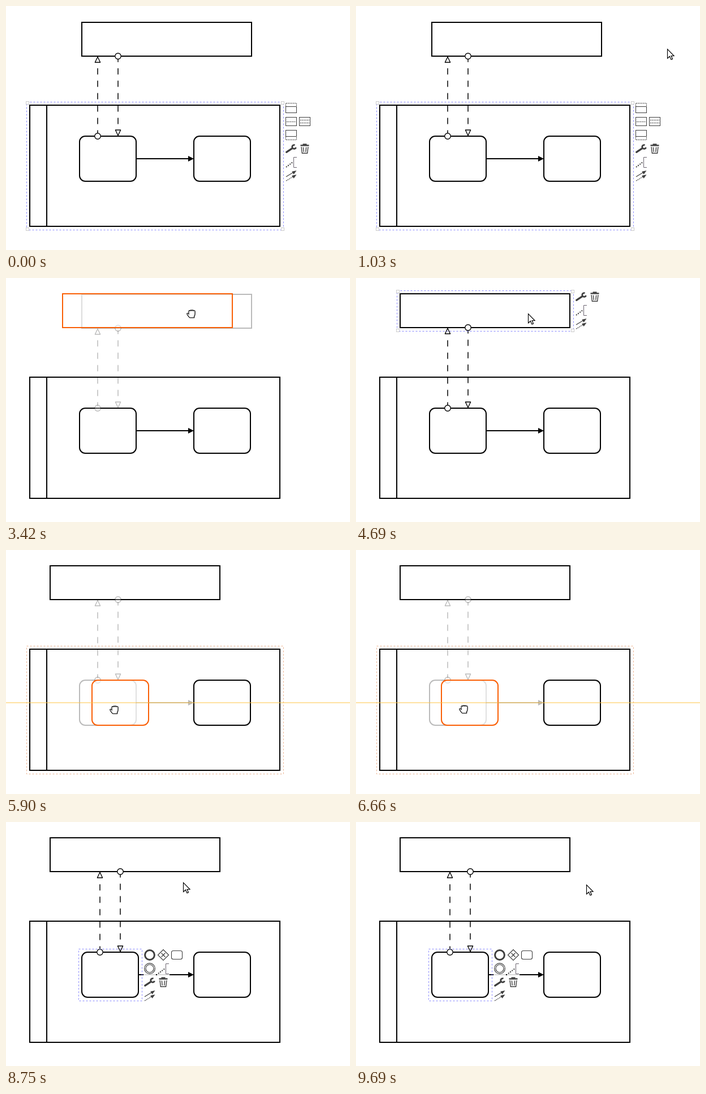
An HTML page with a canvas for the animation above (9.79 s loop, 608 by 433 pixels).

```html
<!DOCTYPE html>
<html lang="en">
<head>
<meta charset="utf-8">
<title>Diagram editor</title>
<style>
html, body { margin: 0; width: 100%; height: 100%; overflow: hidden; background: #fff; }
canvas { display: block; }
</style>
</head>
<body>
<canvas id="stage" width="608" height="433"></canvas>
<script>
const ctx = document.getElementById('stage').getContext('2d');
const LOOP = 9790, TICK = 40;
const BLUE = '#8888ff', HOVER = '#ebb28e', ORANGE = '#fa5f05', ICON = '#3e3e3e';
const POOL = { x: 42, y: 176, w: 442, h: 215 };
const NEXT = { x: 332, y: 231, w: 100, h: 80 };

// Phases of the story, as [start, end) in ms
const PARTNER_DRAG = [2900, 4650];
const TASK_DRAG = [5740, 6820];
const TASK_DRAG_2 = [7500, 7830];
const GRAB = { partner: { x: 360, y: 64 }, task: { x: 168, y: 282 } };

// Pointer moves; each begins where the last one ended and may bend through a control point
const moves = [];
function move(start, end, to, bend) {
  const from = moves.length ? moves[moves.length - 1].to : to;
  const mid = bend || { x: (from.x + to.x) / 2, y: (from.y + to.y) / 2 };
  moves.push({ start, from, mid, to, steps: Math.round((end - start) / TICK) + 1 });
}
const at = (x, y) => ({ x, y });
move(510, 510, at(544, 42));
move(870, 1270, at(475, 100), at(585, 86));
move(1940, 2460, GRAB.partner);
move(2860, 3790, at(305, 63));
move(4090, 4090, at(304, 63));
move(5250, 5490, GRAB.task);
move(5700, 6660, at(189, 282), at(225, 286));
move(7500, 7660, at(172, 276));
move(8100, 8750, at(313, 107), at(131, 272));
move(9050, 9690, at(407, 111));

function pointer(t) {
  const m = moves.filter(m => m.start <= t).pop();
  if (!m) return null;
  const u = Math.min(1, (Math.floor((t - m.start) / TICK) + 1) / m.steps);
  const curve = k => Math.round((1 - u) ** 2 * m.from[k] + 2 * u * (1 - u) * m.mid[k] + u * u * m.to[k]);
  return at(curve('x'), curve('y'));
}

const during = (t, [start, end], tail = 0) => t >= start && t < end + tail;
const inside = (p, r) => p.x >= r.x && p.x <= r.x + r.w && p.y >= r.y && p.y <= r.y + r.h;

function pen(color, width, dash = []) {
  ctx.strokeStyle = color;
  ctx.lineWidth = width;
  ctx.setLineDash(dash);
}

function trace(p) {
  ctx.beginPath();
  for (let i = 0; i < p.length; i += 2) ctx.lineTo(p[i], p[i + 1]);
}

function line(...p) {
  trace(p);
  ctx.stroke();
}

function poly(fill, ...p) {
  trace(p);
  ctx.closePath();
  ctx.fillStyle = fill;
  ctx.fill();
}

function circle(x, y, r, fill = 'transparent') {
  ctx.beginPath();
  ctx.arc(x, y, r, 0, Math.PI * 2);
  ctx.fillStyle = fill;
  ctx.fill();
  ctx.stroke();
}

function box(r, color = '#000', radius = 0, fill = '#fff') {
  pen(color, 2);
  ctx.beginPath();
  ctx.roundRect(r.x, r.y, r.w, r.h, radius);
  ctx.fillStyle = fill;
  ctx.fill();
  ctx.stroke();
}

function faded(on, paint) {
  ctx.globalAlpha = on ? .27 : 1;
  paint();
  ctx.globalAlpha = 1;
}

function outline(r, color) {
  pen(color, 1, [3, 3]);
  ctx.strokeRect(r.x - 5.5, r.y - 5.5, r.w + 12, r.h + 12);
}

function handles(r) {
  pen('#ccc', 1);
  ctx.fillStyle = '#fff';
  for (const x of [r.x - 6.5, r.x + r.w + 2.5])
    for (const y of [r.y - 6.5, r.y + r.h + 2.5]) {
      ctx.fillRect(x, y, 5, 5);
      ctx.strokeRect(x, y, 5, 5);
    }
}

function messageFlow(x, from, to) {
  const d = Math.sign(to - from), base = to - d * 11;
  ctx.save();
  ctx.lineCap = ctx.lineJoin = 'round';
  pen('#000', 1.5, [10, 12]);
  ctx.lineDashOffset = 5;
  line(x, from + d * 5, x, base);
  pen('#000', 1.4);
  circle(x, from, 5.25, '#fff');
  poly('#fff', x, to - d * 1.2, x - 4.6, base, x + 4.6, base);
  ctx.stroke();
  ctx.restore();
}

function sequenceFlow(x) {
  pen('#000', 2);
  line(x, 271, 323, 271);
  poly('#000', 322, 266, 332, 271, 322, 276);
}

// Icons are drawn around their own centre
function split(...rows) {
  pen(ICON, 1);
  ctx.strokeRect(-9.5, -7.5, 19, 15);
  pen(ICON, 1, [2, 1]);
  rows.forEach(y => line(-8, y, 8, y));
}

function lane(side) {
  pen(ICON, 1);
  ctx.strokeRect(-9.5, -2.5 * side, 19, 11 * side);
  pen(ICON, 1, [2, 1]);
  line(-9.5, -3 * side, -9.5, -8.5 * side, 9.5, -8.5 * side, 9.5, -3 * side);
}

const icons = {
  laneAbove: () => lane(1),
  laneBelow: () => lane(-1),
  split: () => split(.5),
  splitThree: () => split(-2.5, 2.5),
  wrench() {
    ctx.lineCap = 'round';
    pen(ICON, 3.2);
    line(-8.3, 6.3, 1.5, -.2);
    ctx.lineCap = 'butt';
    pen(ICON, 2.8);
    ctx.beginPath();
    ctx.arc(5.2, -3, 3.4, .3, 5.1);
    ctx.stroke();
  },
  trash() {
    pen(ICON, 2.4);
    line(-7.5, -5.6, 7.5, -5.6);
    line(-3.5, -7.4, 3.5, -7.4);
    pen(ICON, 1.4);
    line(-6, -3, -4.6, 8.3, 4.6, 8.3, 6, -3);
    for (const s of [-1, 1]) line(2.7 * s, -2.5, 1.7 * s, 6);
  },
  note() {
    pen(ICON, 2, [2, 2]);
    line(-9, 9, 3, 0);
    pen('#6b6470', 1);
    line(10, -8.5, 4.5, -8.5, 4.5, 9.5, 10, 9.5);
  },
  connect() {
    for (const [y, dash] of [[-9, []], [-1.7, [2, 1]]]) {
      pen(ICON, 1.1, dash);
      line(-9, y + 11, 5, y + 2.5);
      poly(ICON, 9.5, y, 1.2, y + 1.8, 4.6, y + 6.8);
    }
  },
  end() { pen(ICON, 3); circle(0, 0, 8.4); },
  ring() { pen(ICON, 1.2); circle(0, 0, 9.4); circle(0, 0, 7); },
  gate() {
    pen(ICON, 1.2);
    line(0, -9.5, 9.5, 0, 0, 9.5, -9.5, 0, 0, -9.5);
    for (const s of [-3.5, 3.5]) line(-3.5, -s, 3.5, s);
  },
  task() {
    pen(ICON, 1.1);
    ctx.beginPath();
    ctx.roundRect(-9.5, -7.5, 19, 15, 3);
    ctx.stroke();
  }
};

const PARTNER_PAD = ['wrench trash', 'note', 'connect'];
const POOL_PAD = ['laneAbove', 'split splitThree', 'laneBelow', ...PARTNER_PAD];
const TASK_PAD = ['end gate task', 'ring note', 'wrench trash', 'connect'];

function pad(r, rows) {
  rows.forEach((row, j) => row.split(' ').forEach((name, i) => {
    ctx.save();
    ctx.translate(r.x + r.w + 20 + i * 24, r.y + 5 + j * 24);
    ctx.fillStyle = 'rgba(255,255,255,.85)';
    ctx.fillRect(-11, -11, 22, 23);
    icons[name]();
    ctx.restore();
  }));
}

function guide(...p) {
  pen('rgba(255,195,66,.5)', 2);
  line(...p);
}

function arrowPath() {
  trace([.5, .6, .5, 17, 4.3, 13.3, 6.9, 19, 9.4, 17.9, 7, 12.5, 12, 12.5]);
  ctx.closePath();
}

function handPath() {
  ctx.beginPath();
  ctx.moveTo(4, 9);
  for (let i = 0; i < 4; i++) ctx.arc(5.4 + i * 2.7, 3 - Math.sin(i) * .8, 1.4, Math.PI, 0);
  ctx.quadraticCurveTo(15.5, 10, 13.5, 12);
  ctx.lineTo(13.5, 14.5);
  ctx.lineTo(5.5, 14.5);
  ctx.quadraticCurveTo(-3, 4.5, 4, 7);
  ctx.closePath();
}

function cursor(p, hand) {
  ctx.save();
  ctx.translate(p.x - (hand ? 7 : 0), p.y - (hand ? 7 : 0));
  pen('#000', 1.15);
  ctx.fillStyle = '#fff';
  ctx.shadowColor = 'rgba(0,0,0,.3)';
  ctx.shadowBlur = 1.5;
  ctx.shadowOffsetX = ctx.shadowOffsetY = .8;
  (hand ? handPath : arrowPath)();
  ctx.fill();
  ctx.shadowColor = 'transparent';
  ctx.stroke();
  ctx.restore();
}

function hovered(t, p, partner, task) {
  if (!p || during(t, [PARTNER_DRAG[0], 5250])) return null;
  // After a drop the old hover stays until the pointer moves again
  if (during(t, [TASK_DRAG[0], 7350]) || during(t, [TASK_DRAG_2[0], 8140])) return POOL;
  return [partner, task, NEXT, POOL].find(r => inside(p, r)) || null;
}

function draw(t) {
  const p = pointer(t);
  const dragPartner = during(t, PARTNER_DRAG);
  const dragTask = during(t, TASK_DRAG) || during(t, TASK_DRAG_2);
  const moved = t >= PARTNER_DRAG[1];
  const partner = { x: moved ? 78 : 134, y: moved ? 28 : 29, w: 300, h: 60 };
  const task = { ...NEXT, x: t < TASK_DRAG[1] ? 130 : t < TASK_DRAG_2[1] ? 151 : 134 };

  let selected = task, tools = TASK_PAD;
  if (t < PARTNER_DRAG[0]) [selected, tools] = [POOL, POOL_PAD];
  else if (t < TASK_DRAG[0]) [selected, tools] = [partner, PARTNER_PAD];
  if (dragPartner || dragTask) selected = null;
  const hover = hovered(t, p, partner, task);

  ctx.fillStyle = '#fff';
  ctx.fillRect(0, 0, 608, 433);

  box(POOL);
  line(72, 176, 72, 391);
  faded(dragPartner, () => box(partner));
  faded(dragTask, () => box(task, '#000', 10));
  box(NEXT, '#000', 10);
  faded(dragTask, () => sequenceFlow(task.x + task.w));
  faded(dragTask || dragPartner, () => {
    const bottom = partner.y + partner.h;
    messageFlow(task.x + 32, task.y, bottom);
    messageFlow(task.x + 68, bottom, task.y);
  });

  if (selected && selected !== hover) outline(selected, BLUE);
  if (hover) outline(hover, HOVER);
  if (selected) {
    if (selected !== task) handles(selected);
    pad(selected, tools);
  }

  if (dragPartner) {
    const center = POOL.x + POOL.w / 2;
    let x = partner.x + p.x - GRAB.partner.x;
    const snapped = Math.abs(x + partner.w / 2 - center) <= 7;
    if (snapped) x = center - partner.w / 2;
    box({ ...partner, x, y: partner.y + p.y - GRAB.partner.y }, ORANGE, 0, 'rgba(255,255,255,.5)');
    if (snapped) guide(center, 0, center, 433);
  }
  if (dragTask) {
    box({ ...task, x: 130 + p.x - GRAB.task.x }, ORANGE, 10, 'rgba(255,255,255,.55)');
    guide(0, 271, 608, 271);
  }
  // The closed hand lingers for one tick after each drop
  if (p) cursor(p, [PARTNER_DRAG, TASK_DRAG, TASK_DRAG_2].some(d => during(t, d, TICK)));
}

const begin = performance.now();
function tick() {
  draw((performance.now() - begin) % LOOP);
  requestAnimationFrame(tick);
}
tick();
</script>
</body>
</html>
```
